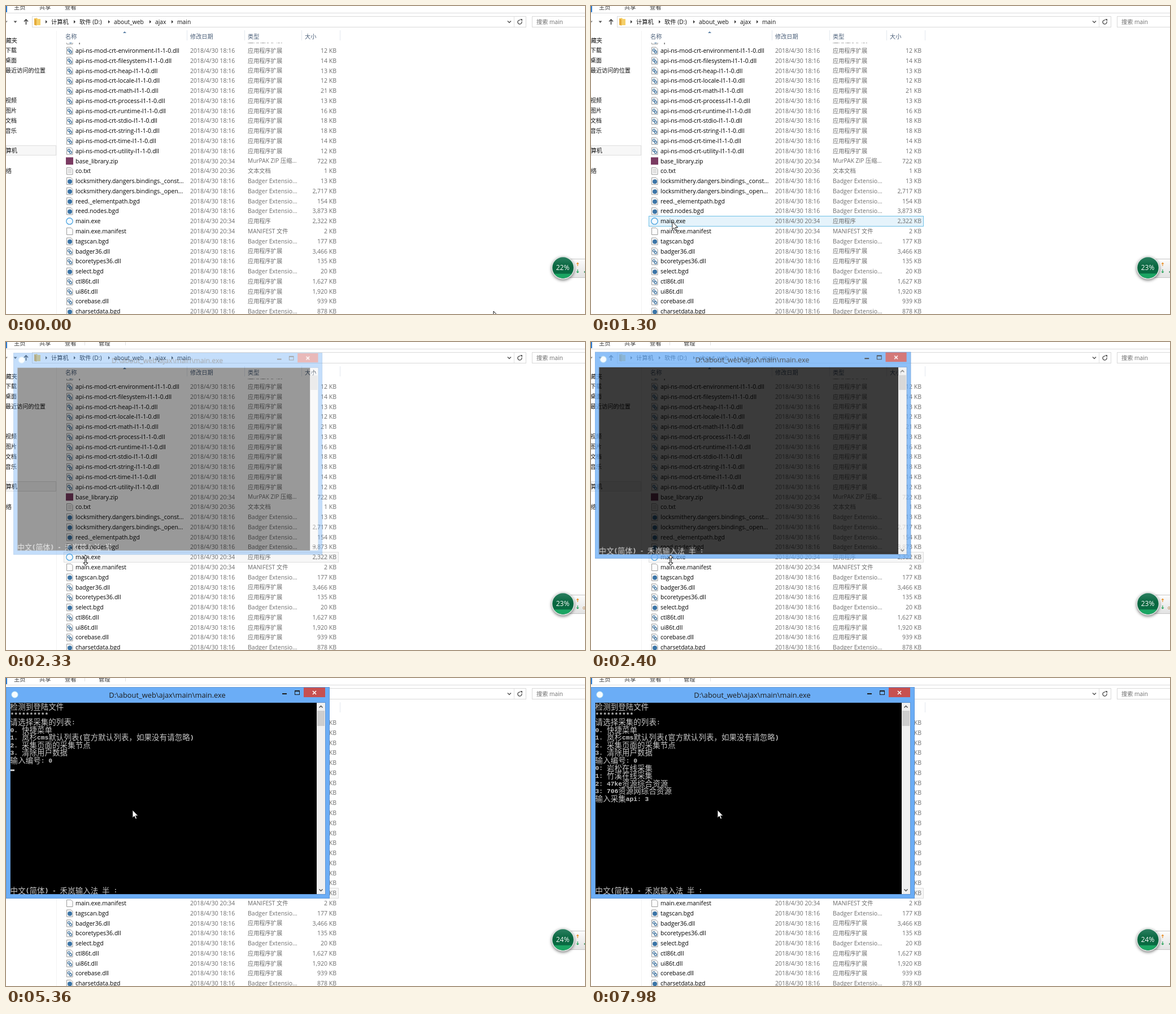
Animation of 1025x546 px, one loop 8 s. Source, as an HTML page with a canvas:

```html
<!DOCTYPE html>
<html lang="zh-CN">
<head>
<meta charset="utf-8">
<style>
html, body { margin: 0; width: 100%; height: 100%; overflow: hidden; background: #fff; }
canvas { display: block; }
</style>
</head>
<body>
<canvas id="stage" width="1025" height="546"></canvas>
<script>
const LOOP = 8000;
const SANS = '"Open Sans", "Noto Sans CJK SC", "Noto Sans CJK", sans-serif';
const MONO = '"Liberation Mono", monospace';
const GREY = '#6d6d6d';
const stage = document.getElementById('stage');
const screen = stage.getContext('2d');
const layer = Object.assign(document.createElement('canvas'), { width: 1025, height: 546 });
let g = screen;

// ---- drawing helpers ----
const isWide = s => /[^\x00-\x7f]/.test(s);

function rect(x, y, w, h, fill, stroke) {
  if (fill) { g.fillStyle = fill; g.fillRect(x, y, w, h); }
  if (stroke) { g.strokeStyle = stroke; g.lineWidth = 1; g.strokeRect(x + .5, y + .5, w - 1, h - 1); }
}
function text(s, x, mid, color = '#000', align = 'left', size = isWide(s) ? 10.2 : 10.5) {
  g.font = `${size}px ${SANS}`;
  g.fillStyle = color;
  g.textAlign = align;
  g.fillText(s, x, mid + size * .36);
}
function shape(points, fill, stroke, width = 1, closed = true) {
  g.beginPath();
  points.forEach(([x, y]) => g.lineTo(x, y));
  if (closed) g.closePath();
  if (fill) { g.fillStyle = fill; g.fill(); }
  if (stroke) { g.strokeStyle = stroke; g.lineWidth = width; g.stroke(); }
}
const line = (points, color, width) => shape(points, null, color, width, false);
function circle(x, y, r, fill, stroke, width = 1) {
  g.beginPath();
  g.arc(x, y, r, 0, 7);
  if (fill) { g.fillStyle = fill; g.fill(); }
  if (stroke) { g.strokeStyle = stroke; g.lineWidth = width; g.stroke(); }
}
const chevron = (x, y, dir, color, s = 3) =>
  line([[x - s, y - dir * s / 2], [x, y + dir * s / 2], [x + s, y - dir * s / 2]], color, 1.5);

// ---- file list ----
const apiNames = 'environment 12 filesystem 14 heap 13 locale 12 math 21 process 13 runtime 16 stdio 18 string 18 time 14 utility 12'
  .split(' ');
const files = [];
for (let i = 0; i < apiNames.length; i += 2)
  files.push([`api-ns-mod-crt-${apiNames[i]}-l1-1-0.dll`, apiNames[i + 1]]);
files.push(
  ['base_library.zip', '722', '20:34'], ['co.txt', '1', '20:36'],
  ['locksmithery.dangers.bindings._const...', '13', '18:16', 'bgd'],
  ['locksmithery.dangers.bindings._open...', '2,717', '18:16', 'bgd'],
  ['reed._elementpath.bgd', '154'], ['reed.nodes.bgd', '3,873'],
  ['main.exe', '2,322', '20:34'], ['main.exe.manifest', '2', '20:34'],
  ['tagscan.bgd', '177'], ['badger36.dll', '3,466'], ['bcoretypes36.dll', '135'],
  ['select.bgd', '20'], ['ctl86t.dll', '1,627'], ['ui86t.dll', '1,920'],
  ['corebase.dll', '939'], ['charsetdata.bgd', '878']);
const kinds = {
  dll: '应用程序扩展', zip: 'MurPAK ZIP 压缩...', txt: '文本文档', bgd: 'Badger Extensio...',
  exe: '应用程序', manifest: 'MANIFEST 文件'
};
const MAIN_ROW = 17;
const rowMid = i => 79.2 + i * 17.78;

function fileIcon(kind, y) {
  if (kind === 'zip') return rect(106, y - 6.5, 13, 13, '#7b3b62');
  if (kind === 'exe') return circle(112.5, y, 5.7, '#f4faff', '#4aa3df', 1.3);
  shape([[107.5, y - 6], [115, y - 6], [118, y - 3], [118, y + 6.2], [107.5, y + 6.2]], '#fcfcfc', '#9a9a9a');
  if (kind === 'dll') {
    circle(111.4, y - 1, 2, '#fff', '#41749f', 1.3);
    circle(114.4, y + 2.3, 2, '#fff', '#41749f', 1.3);
  }
  if (kind === 'bgd') circle(113, y + .8, 4, '#3b74a6');
  if (kind === 'txt')
    for (let k = -3; k < 5; k += 2) line([[109.5, y + k], [116, y + k]], '#b5b5b5', .8);
}
function fileRow(i, [name, size, time = '18:16', kind = name.split('.').pop()]) {
  const y = rowMid(i);
  fileIcon(kind, y);
  text(name, 123, y);
  text('2018/4/30 ' + time, 326, y, GREY);
  text(kinds[kind], 428, y, GREY);
  text(size + ' KB', 585, y, GREY, 'right');
}
function rowBox(i, fill, border) {
  rect(102, Math.round(rowMid(i) - 9), 487, 19, fill, border);
}

// ---- explorer ----
function explorer(t, hover) {
  rect(0, 0, 1025, 546, '#fff');
  rect(0, 0, 2, 11, '#2a7ad1');
  rect(0, 12, 1025, 1, '#dadbdc');
  [['主页', 14], ['共享', 59], ['查看', 104]].forEach(([s, x]) => text(s, x, 2.5, '#333'));
  if (t >= 1530) {
    text('管理', 164, 2.5, '#333');
    rect(139, 0, 1, 6, '#e0e0e0');
    rect(211, 0, 1, 6, '#e0e0e0');
  }

  chevron(-1, 28, 1, '#777');
  shape([[13.5, 26.5], [19.5, 26.5], [16.5, 30]], '#555');
  line([[35.5, 33], [35.5, 24]], '#444', 1.6);
  line([[32, 27.5], [35.5, 24], [39, 27.5]], '#444', 1.6);
  rect(46, 18, 875, 20, '#fff', '#d9d9d9');
  rect(899, 19, 1, 18, '#e1e1e1');
  rect(931, 18, 100, 20, '#fff', '#d9d9d9');
  shape([[50, 22], [55, 21], [56, 23], [61, 23], [61, 34], [50, 34]], '#f5cf69');
  shape([[50, 22], [54, 24], [54, 35], [50, 33]], '#e5ac3c');
  [['计算机', 80], ['软件 (D:)', 130], ['about_web', 191], ['ajax', 264], ['main', 303]].forEach(([s, x]) => {
    text(s, x, 28, '#111', 'left', 10.3);
    shape([[x - 10, 25], [x - 7, 28], [x - 10, 31]], '#333');
  });
  chevron(891, 28, 1, '#555');
  g.beginPath();
  g.arc(909.5, 28.5, 3.6, -.3, 5);
  g.strokeStyle = '#555';
  g.lineWidth = 1.4;
  g.stroke();
  shape([[910, 23], [914, 23], [914, 27]], '#555');
  text('搜索 main', 939, 28, GREY);

  rect(89, 44, 1, 502, '#f3f3f3');
  rect(0, 247, 89, 18, '#f7f7f7', '#dedede');
  [['收藏夹', 20, 61], ['下载', 19, 78], ['桌面', 19, 96], ['最近访问的位置', 70, 114], ['视频', 19, 167],
   ['图片', 19, 185], ['文档', 19, 203], ['音乐', 19, 221], ['计算机', 20, 256], ['网络', 10, 292]]
    .forEach(([s, x, y]) => text(s, x, y, '#111', 'right'));

  [['名称', 105], ['修改日期', 326], ['类型', 428], ['大小', 529]].forEach(([s, x]) => text(s, x, 54.5, '#4c607a'));
  [320, 422, 523, 591].forEach(x => rect(x, 43, 1, 18, '#e3e8ee'));
  shape([[207, 48], [210, 45], [213, 48]], '#5a7fa5');

  if (hover >= 0) rowBox(hover, '#e5f3fb', '#70c0e7');
  if (t >= 2170) rowBox(MAIN_ROW, '#f7f7f7', '#dedede');
  else if (t >= 1530) rowBox(MAIN_ROW, '#cbe8f6', '#26a0da');

  g.save();
  g.beginPath();
  g.rect(0, 65, 1025, 481);
  g.clip();
  fileRow(-1, ['api.dll', '16']);
  files.forEach((file, i) => fileRow(i, file));
  g.restore();
}

// ---- memory gauge ----
function gauge(t) {
  const percent = t < 920 ? 22 : t < 3950 ? 23 : t < 5960 ? 24 : t < 6980 ? 25 : 24;
  const panel = g.createLinearGradient(0, 448, 0, 482);
  panel.addColorStop(0, '#fdfdfd');
  panel.addColorStop(1, '#e2e2e2');
  rect(988, 448, 40, 34, panel, '#c6c6c6');
  g.save();
  g.shadowColor = 'rgba(0,0,0,.5)';
  g.shadowBlur = 5;
  g.shadowOffsetY = 2;
  circle(986, 464, 20.5, '#dfe5e2');
  g.restore();
  const body = g.createLinearGradient(0, 445, 0, 483);
  body.addColorStop(0, '#2b7f60');
  body.addColorStop(.45, '#08663f');
  body.addColorStop(1, '#0b7046');
  circle(986, 464, 18.8, body);
  g.save();
  g.beginPath();
  g.arc(986, 464, 18.8, 0, 7);
  g.clip();
  rect(966, 483 - percent * .38, 40, 12, '#1ba563');
  g.restore();
  text(percent + '%', 985.5, 463.5, '#fff', 'center', 12);
  arrow(1012, 458, -1, '#e8912d');
  arrow(1012, 470, 1, '#27a35a');
  if (t < 1950 || t >= 7980 || (t >= 4970 && t < 6980)) rect(1023.5, 470, 1.5, 3, '#4f9a6c');
  else if (t < 2550) text('0', 1021, 471, '#b06a20', 'left', 8);
}
function arrow(x, y, dir, color) {
  line([[x, y - 3], [x, y + 3]], color, 1.2);
  shape([[x - 2.7, y + dir * .7], [x + 2.7, y + dir * .7], [x, y + dir * 3.6]], color);
}

// ---- console window ----
const CELL = 6.77, ROW = 13.57;
const IME = '中文(简体) - 禾岚输入法 半 :';
const menu = ['检测到登陆文件', '**********', '请选择采集的列表:', '0. 快捷菜单',
  '1. 岚杉cms默认列表(官方默认列表，如果没有请忽略)', '2. 采集页面的采集节点', '3. 清除用户数据', '输入编号:'];
const sources = ['0: 岩松在线采集', '1: 竹溪在线采集', '2: 47ke资源综合资源', '3: 706资源网综合资源', '输入采集api:'];

function consoleLine(s, row) {
  let x = 7.6;
  const base = 44.2 + row * ROW;
  g.textAlign = 'left';
  g.fillStyle = '#c6c6c6';
  for (const ch of s) {
    const wide = isWide(ch);
    g.font = wide ? `13.4px "Noto Sans CJK SC", "Noto Sans CJK", sans-serif` : `bold 11.28px ${MONO}`;
    g.fillText(ch, x, base + (wide ? 11.8 : 10.6) + (ch === '*' ? 1 : 0));
    x += wide ? CELL * 2 : CELL;
  }
}
function caret(col, row) {
  rect(Math.round(7.6 + col * CELL), Math.round(44.2 + (row + 1) * ROW) - 4, 7, 3, '#c6c6c6');
}
function consoleText(t) {
  if (t >= 2780) {
    menu.forEach(consoleLine);
    if (t >= 4410) consoleLine(' '.repeat(10) + '0', 7);
    if (t >= 6280) sources.forEach((s, i) => consoleLine(s, 8 + i));
    if (t >= 7980) consoleLine(' '.repeat(13) + '3', 12);
  }
  const shown = (from, to) => t >= from && t < to;
  if (shown(3720, 4260)) caret(10, 7);
  if (shown(4820, 5170)) caret(11, 7);
  if (shown(5360, 5810)) caret(0, 8);
  if (shown(6280, 6900) || shown(7430, 7980)) caret(13, 12);
  consoleLine(IME, 24);
}
function consoleWindow(t) {
  rect(0, 16, 573, 375, '#6badf6', '#5f98d8');
  circle(15.5, 29.5, 5.7, '#f6fcff', '#a9dcf2');
  text('D:\\about_web\\ajax\\main\\main.exe', 285.5, 30, '#1c1c1c', 'center', 12.85);
  rect(489, 27, 8, 2, '#1c1c1c');
  rect(511, 22, 9, 8, null, '#1c1c1c');
  rect(511, 22, 9, 2, '#1c1c1c');
  rect(527, 17, 38, 17, '#c75050');
  line([[543, 23], [549, 29]], '#fff', 1.6);
  line([[549, 23], [543, 29]], '#fff', 1.6);
  rect(7, 43, 559, 341, '#5f94cf');
  rect(8, 44, 542, 339, '#000');
  rect(550, 44, 15, 339, '#f0f0f0');
  rect(551, 58, 13, 27, '#cdcdcd');
  chevron(557.5, 51, -1, '#505050');
  chevron(557.5, 376, 1, '#505050');
  consoleText(t);
}
function openWindow(t) {
  if (t < 2330) return;
  const [scale, alpha] = t < 2400 ? [.955, .4] : t < 2470 ? [.977, .77] : t < 2550 ? [.993, .94] : [1, 1];
  g = layer.getContext('2d');
  g.clearRect(0, 0, 1025, 546);
  consoleWindow(t);
  g = screen;
  g.save();
  g.globalAlpha = alpha;
  g.translate(286.5, 203.5 - (1 - scale) * 120);
  g.scale(scale, scale);
  g.drawImage(layer, -286.5, -203.5);
  g.restore();
}

// ---- pointer ----
// Moves advance in even hops, the first one happening at `start`.
const moves = [
  { start: 70, end: 620, hops: 8, from: [863, 541], to: [162, 352] },
  { start: 920, end: 1380, hops: 7, from: [162, 352], to: [141, 387] },
  { start: 2470, end: 2950, hops: 7, from: [141, 387], to: [224, 234] }
];
function pointerAt(t) {
  let at = moves[0].from;
  for (const { start, end, hops, from, to } of moves) {
    if (t < start) break;
    const hop = Math.min(hops, Math.floor((t - start) / (end - start) * (hops - 1) + 1e-6) + 1);
    const eased = 1 - (1 - hop / hops) ** 1.6;
    at = from.map((v, i) => v + (to[i] - v) * eased);
  }
  return at;
}
function pointer(t, [x, y]) {
  const sized = t >= 2170 && t < 2470;
  const points = sized
    ? [[0, -9], [4, -4.5], [1.2, -4.5], [1.2, 4.5], [4, 4.5], [0, 9], [-4, 4.5], [-1.2, 4.5], [-1.2, -4.5], [-4, -4.5]]
    : [[0, 0], [0, 14], [3.2, 11], [5.4, 16], [7.6, 15], [5.5, 10.2], [9.8, 10.2]];
  shape(points.map(([dx, dy]) => [x + dx, y + dy]), '#fff', '#111', 1);
}

function draw(t) {
  const at = pointerAt(t);
  const row = Math.round((at[1] - rowMid(0)) / 17.78);
  explorer(t, t < 1530 && at[0] < 589 ? row : -1);
  gauge(t);
  openWindow(t);
  pointer(t, at);
}
function tick() {
  draw(performance.now() % LOOP);
  requestAnimationFrame(tick);
}
tick();
</script>
</body>
</html>
```
